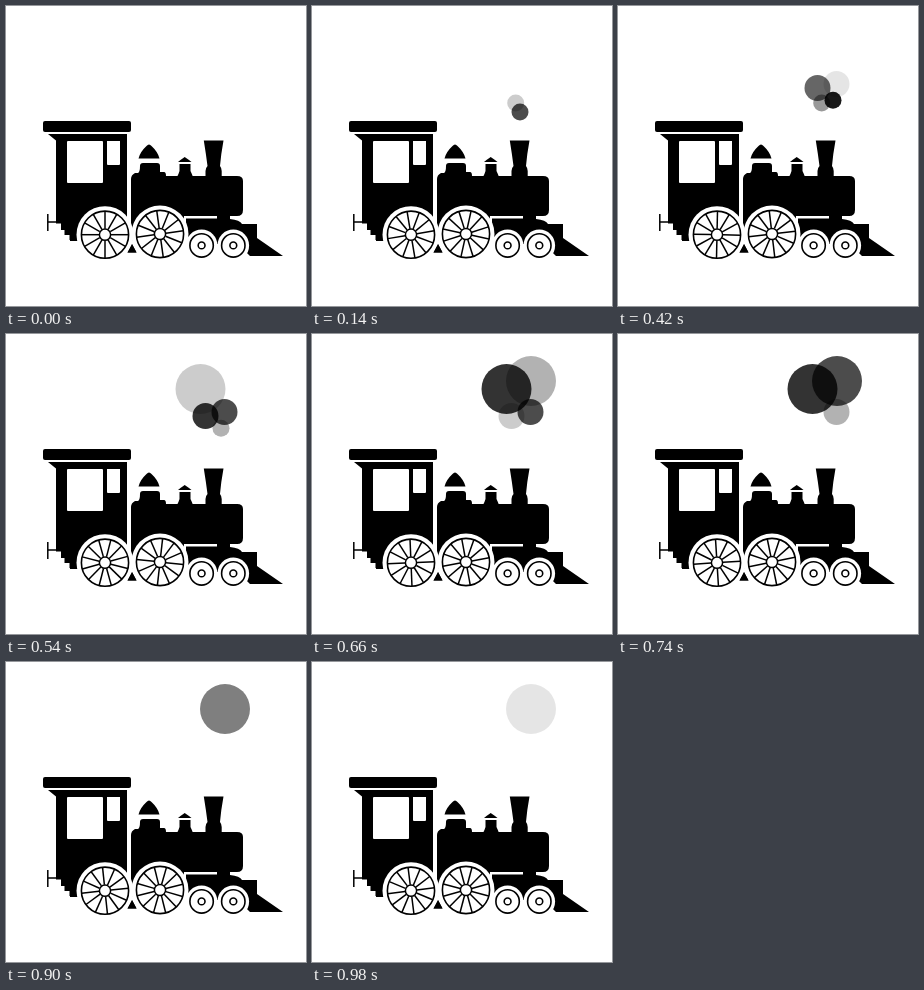
These frames come from a looping animation (300x300 px, 1 s). An HTML page:

```html
<!DOCTYPE html>
<html lang="en">
<head>
<meta charset="utf-8">
<title>Steam train</title>
<style>
  html, body { margin: 0; width: 100%; height: 100%; overflow: hidden; background: #fff; }
  svg { display: block; width: 100%; height: 100%; }
</style>
</head>
<body>
<svg viewBox="0 0 300 300">
  <g id="smoke"></g>

  <!-- cab -->
  <rect x="37" y="115" width="88" height="11" rx="2"/>
  <path fill-rule="evenodd" d="M42 128H121V235H64V234H63.500V229H58.500V224H55V217.500H50V134.500Z
    M62 135H96Q97 135 97 136V176Q97 177 96 177H62Q61 177 61 176V136Q61 135 62 135Z
    M101 135H114V158Q114 159 113 159H102Q101 159 101 158Z"/>
  <path d="M41.800 208V225M41.800 216H52" fill="none" stroke="#000" stroke-width="1.500"/>

  <!-- boiler, domes and chimney -->
  <path d="M125 173Q125 169 129 167H132Q134 166 134 160Q134 157 137 157H151Q154 157 154 160V166H158Q160 166 160 170H231Q237 170 237 175V204Q237 210 231 210H224V213Q234 214 236 218H251V232L277 250H244L232 238H180V212.500H211V210H178V235H125Z"/>
  <path d="M132.500 152.500Q134 146 140.500 140Q143 137 145.500 140Q152 146 153.500 152.500Z"/>
  <path d="M172 156Q175 153.500 178.700 151Q182.500 153.500 185.500 156Z"/>
  <path d="M173.500 158H184.500V165Q185.500 167 187 171H171Q173 167 173.500 165Z"/>
  <path d="M197.800 134.500H217.500Q215 148 214 160Q215.700 162 215.700 165V171H199.500V165Q199.500 162 201.500 160Q200 148 197.800 134.500Z"/>
  <path d="M121.500 246.500H130.500L126 238Z"/>

  <g id="wheels"></g>
</svg>

<script>
const LOOP = 1000, FADE = 200, STAGGER = 100, SPOKES = 12;

// x, y, radius, in order of appearance
const puffs = [
  [208, 106, 8.5], [203.7, 97, 8.5], [215, 94.3, 8.5],
  [199.5, 82, 13], [218.5, 78, 13],
  [194.5, 55, 25], [219, 47, 25]
];
// x, y, starting angle
const drivers = [[99, 228.7, 0], [154, 228, -8]];
const rollers = [[195.6, 239.4], [227.3, 239.4]];

function add(parent, tag, attrs) {
  const el = document.createElementNS("http://www.w3.org/2000/svg", tag);
  for (const key in attrs) el.setAttribute(key, attrs[key]);
  parent.appendChild(el);
  return el;
}

function circle(parent, cx, cy, r, fill, width = 0) {
  return add(parent, "circle", { cx, cy, r, fill, stroke: width ? "#000" : "none", "stroke-width": width });
}

const smoke = document.getElementById("smoke");
const wheels = document.getElementById("wheels");
const clouds = puffs.map(([x, y, r]) => circle(smoke, x, y, r, "#000"));

// white clearances first, so no wheel is cut by its neighbour
drivers.forEach(([x, y]) => circle(wheels, x, y, 28.5, "#fff"));
rollers.forEach(([x, y]) => circle(wheels, x, y, 15.8, "#fff"));
add(wheels, "path", { d: "M121.5 246.5H130.5L126 238Z" });

rollers.forEach(([x, y]) => {
  circle(wheels, x, y, 11.7, "#fff", 1.6);
  circle(wheels, x, y, 3.4, "#fff", 1.6);
});

const spinners = drivers.map(([x, y]) => {
  circle(wheels, x, y, 23.6, "#fff", 1.6);
  const g = add(wheels, "g", {});
  for (let i = 0; i < SPOKES; i++) {
    add(g, "path", {
      d: `M${x} ${y - 6}V${y - 23.5}`, stroke: "#000", "stroke-width": 1.5,
      transform: `rotate(${i * 360 / SPOKES} ${x} ${y})`
    });
  }
  circle(wheels, x, y, 5.6, "#fff", 1.5);
  return g;
});

function draw(t) {
  clouds.forEach((el, i) => {
    const peak = i * STAGGER + FADE;
    el.setAttribute("opacity", Math.max(0, 1 - Math.abs(t - peak) / FADE));
  });
  spinners.forEach((g, i) => {
    const [x, y, angle] = drivers[i];
    g.setAttribute("transform", `rotate(${angle + t / LOOP * 360} ${x} ${y})`);
  });
}

let start;
function tick(now) {
  start ??= now;
  draw((now - start) % LOOP);
  requestAnimationFrame(tick);
}
draw(0);
requestAnimationFrame(tick);
</script>
</body>
</html>
```
